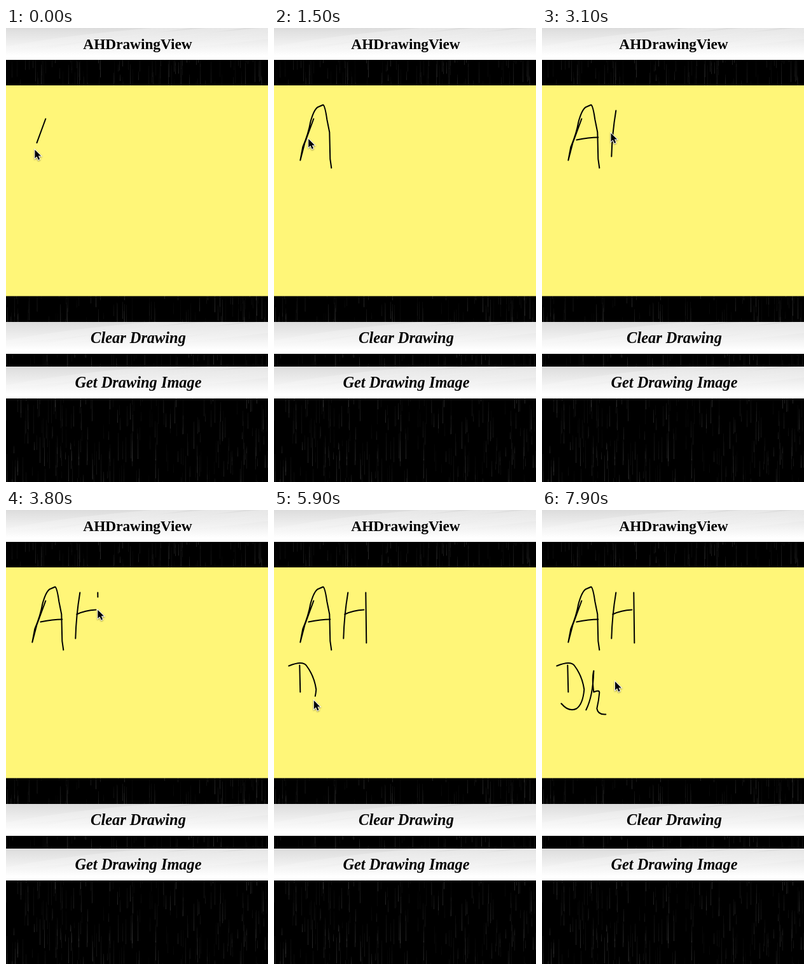
Write an HTML page with a canvas that moves like this. It is 412 px wide and 712 px high and loops after 8000 ms.

```html
<!DOCTYPE html>
<html lang="en">
<head>
<meta charset="utf-8">
<title>AHDrawingView</title>
<style>
  html, body { margin: 0; width: 100%; height: 100%; overflow: hidden; background: #000; }
  canvas, svg { position: absolute; left: 0; top: 0; width: 412px; height: 712px; }
  .label {
    position: absolute; left: 1px; width: 412px; height: 50px;
    font: bold 23.3px/50px "Liberation Serif", serif;
    text-align: center; white-space: nowrap;
  }
  .button { left: 2px; font-style: italic; font-size: 24.4px; }
  #ink path { fill: none; stroke: #000; stroke-width: 2; stroke-linecap: round; stroke-linejoin: round; }
  #pointer { filter: drop-shadow(0 1.5px 1.2px rgba(0, 0, 0, .45)); }
</style>
</head>
<body>
<canvas id="backdrop"></canvas>
<div class="label" style="top:0">AHDrawingView</div>
<div class="label button" style="top:461px">Clear Drawing</div>
<div class="label button" style="top:531px">Get Drawing Image</div>
<svg viewBox="0 0 412 712">
  <g id="ink" transform="translate(.3 .5)"></g>
  <path id="pointer" d="M0 0V13.4L3.1 10.6L5.4 15.8L7.7 14.8L5.5 9.7H9.6Z"
        stroke="#fff" stroke-width="1.8" paint-order="stroke"/>
</svg>
<script>
const W = 412, H = 712, LOOP = 8000, STEP = 100, INK_LAG = 40;

// The pen follows d between two times, then glides past `via` to the next stroke.
const strokes = [
  { from: -190, to: 810, via: [64, 96],
    d: "M62 142L48 180L41 207L45 186Q54 165 57 147Q63 125 70 123L77 120Q80 122 83 143L87 163L88 205L90 219" },
  { from: 1720, to: 2060, via: [100, 140], d: "M54 175Q74 171 88 171" },
  { from: 2410, to: 2650, via: [68, 178], d: "M116 129Q110 165 109 201" },
  { from: 3280, to: 3560, via: [146, 140], d: "M111 163Q124 157 141 156" },
  { from: 3746, to: 3906, via: [85, 225], d: "M144 129L145 208" },
  { from: 4580, to: 5050, via: [50, 180], d: "M40 243L41 285" },
  { from: 5380, to: 6160, via: [50, 338],
    d: "M23 244Q45 235 51 244Q63 260 66 281Q64 304 54 311Q42 317 30 303" },
  { from: 6660, to: 6830, via: [81, 252], d: "M69 313Q80 291 81 252" },
  { from: 6830, to: 7460, via: [140, 300],
    d: "M81 252Q78 262 81 285Q90 281 90 286Q89 298 86 311Q88 321 100 320" }
];
const rest = { from: 7800, first: { x: 115, y: 268 } };

const clamp = v => Math.min(1, Math.max(0, v));
const ease = p => p < .5 ? 16 * p ** 5 : 1 - 16 * (1 - p) ** 5;
const mix = (a, b, p) => a + (b - a) * p;

const ink = document.getElementById("ink");
const pointer = document.getElementById("pointer");
for (const s of strokes) {
  s.path = document.createElementNS("http://www.w3.org/2000/svg", "path");
  s.path.setAttribute("d", s.d);
  ink.append(s.path);
  s.length = s.path.getTotalLength();
  s.first = s.path.getPointAtLength(0);
  s.last = s.path.getPointAtLength(s.length);
}

const progress = (s, time) => clamp((time - s.from) / (s.to - s.from));

function penAt(time) {
  const i = strokes.findLastIndex(s => s.from <= time);
  const s = strokes[i];
  if (time < s.to) return s.path.getPointAtLength(s.length * progress(s, time));
  const next = strokes[i + 1] || rest;
  const p = ease(clamp((time - s.to) / Math.max(1, next.from - s.to)));
  const glide = (a, b, c) => mix(mix(a, b, p), mix(b, c, p), p);
  return {
    x: glide(s.last.x, s.via[0], next.first.x),
    y: glide(s.last.y, s.via[1], next.first.y)
  };
}

function render(time) {
  for (const s of strokes) {
    const p = progress(s, time - INK_LAG);
    s.path.style.visibility = p > 0 ? "visible" : "hidden";
    s.path.style.strokeDasharray = `${s.length * p} ${s.length + 9}`;
  }
  const { x, y } = penAt(time);
  pointer.setAttribute("transform", `translate(${x} ${y + 1})`);
}

function fade(c, y0, y1, from, to) {
  const g = c.createLinearGradient(0, y0, 0, y1);
  g.addColorStop(0, from);
  g.addColorStop(1, to);
  return g;
}

function drawRain(c) {
  let seed = 29;
  const random = () => (seed = seed * 16807 % 2147483647) / 2147483647;
  for (let i = 0; i < 1250; i++) {
    const x = Math.floor(random() * W), y = random() * (H + 40) - 40;
    const length = 10 + random() * 36, alpha = .04 + .13 * random() ** 2;
    c.fillStyle = fade(c, y, y + length, `rgba(255,255,255,${alpha * .4})`, `rgba(255,255,255,${alpha})`);
    c.fillRect(x, y, 1, length);
  }
}

function drawBar(c, top) {
  c.save();
  c.translate(0, top);
  c.beginPath();
  c.rect(0, 0, W, 50);
  c.clip();
  c.fillStyle = fade(c, 0, 44, "#dcdcdc", "#fff");
  c.fillRect(0, 0, W, 50);
  // Overlapping blades of light, each sweeping up to the right.
  for (let i = 0; i < 4; i++) {
    const x = i * 85 - 30;
    c.beginPath();
    c.moveTo(x, 36);
    c.quadraticCurveTo(x + 90, 14, x + 260, 0);
    c.lineTo(x + 320, 0);
    c.quadraticCurveTo(x + 150, 24, x, 36);
    c.fillStyle = fade(c, 0, 36, "rgba(255,255,255,.3)", "rgba(255,255,255,.12)");
    c.fill();
  }
  c.restore();
}

function drawBackdrop() {
  const canvas = document.getElementById("backdrop");
  const scale = window.devicePixelRatio || 1;
  canvas.width = W * scale;
  canvas.height = H * scale;
  const c = canvas.getContext("2d");
  c.scale(scale, scale);
  c.fillRect(0, 0, W, H);
  drawRain(c);
  for (const top of [0, 461, 531]) drawBar(c, top);
  c.fillStyle = "#fff678";
  c.fillRect(0, 90, W, 330.5);
}

drawBackdrop();
const start = performance.now();
function tick() {
  const elapsed = (performance.now() - start) % LOOP;
  render(Math.floor(elapsed / STEP) * STEP);
  requestAnimationFrame(tick);
}
tick();
</script>
</body>
</html>
```
